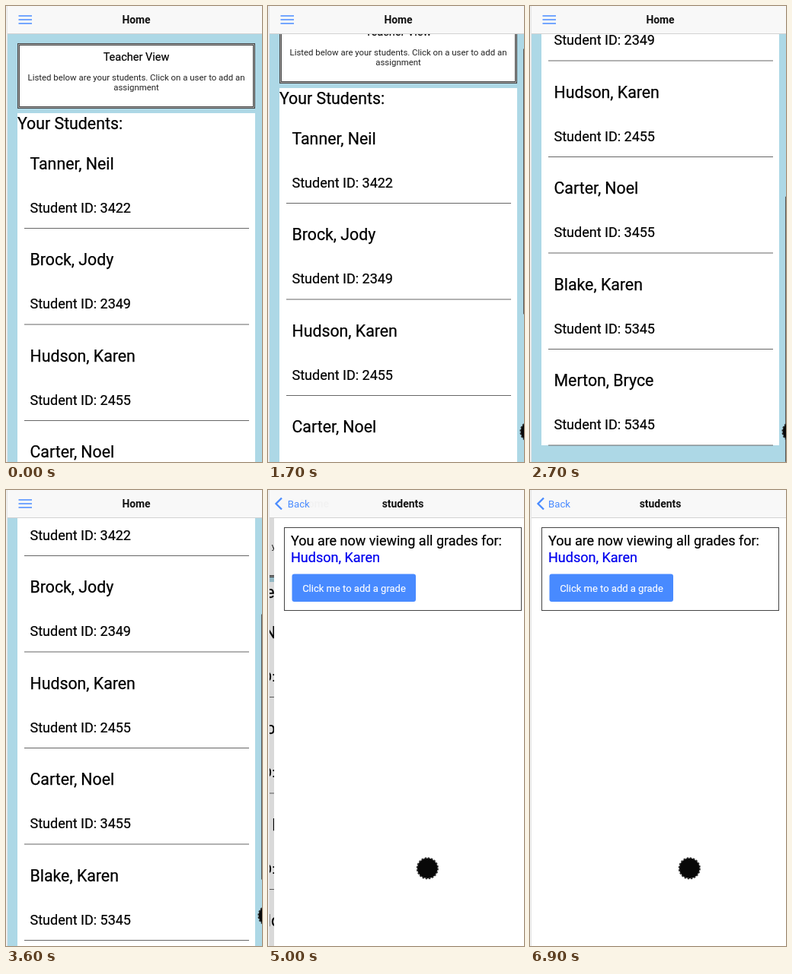
An HTML page for the animation above (7000 ms loop, 336 by 600 pixels).

```html
<!DOCTYPE html>
<html lang="en">
<head>
<meta charset="utf-8">
<title>Student list</title>
<style>
  html, body { margin: 0; width: 100%; height: 100%; overflow: hidden; background: #fff; }
  svg { display: block; width: 100vw; height: 100vh; font-family: Roboto, "Liberation Sans", sans-serif; }
  .h { font-size: 21.3px; stroke: #000; stroke-width: .25px; }
  .m { font-size: 18px; stroke: #000; stroke-width: .22px; }
  .s { font-size: 14.5px; stroke: #000; stroke-width: .2px; }
  .p { font-size: 11.4px; fill: #222; }
  .t { font-size: 13.9px; font-weight: 700; fill: #111; }
  .mid { text-anchor: middle; }
</style>
</head>
<body>
<svg viewBox="0 0 336 600" preserveAspectRatio="none">
  <defs>
    <clipPath id="view"><rect x="2" y="37" width="334" height="563"/></clipPath>
  </defs>
  <rect width="336" height="600" fill="#fff"/>

  <g clip-path="url(#view)">
    <g id="home">
      <rect x="2" y="36" width="338" height="564" fill="#add8e6"/>
      <g id="list">
        <rect x="15" y="49" width="312" height="86" fill="#444"/>
        <rect x="16" y="50" width="310" height="84" fill="#aaa"/>
        <rect x="17" y="51" width="308" height="82" fill="#444"/>
        <rect x="18" y="52" width="306" height="80" fill="#fff"/>
        <text class="s mid" x="171" y="71.5">Teacher View</text>
        <text class="p mid" x="171" y="97.5">Listed below are your students. Click on a user to add an</text>
        <text class="p mid" x="171" y="111">assignment</text>
        <rect x="15" y="141" width="312" height="784" fill="#fff"/>
        <text class="h" x="15" y="161.5">Your Students:</text>
      </g>
    </g>
    <rect id="shade" x="2" y="36" width="334" height="564" opacity="0"/>
    <rect id="bar" x="335" width="1" height="349" fill="#555" opacity="0"/>
    <g id="grades">
      <rect x="2" y="36" width="338" height="564" fill="#fff"/>
      <rect x="15.5" y="49.5" width="311" height="109" fill="#fff" stroke="#444"/>
      <text class="m" x="24" y="72.5">You are now viewing all grades for:</text>
      <text id="who" class="m" x="24" y="94.5" style="fill:#00e;stroke:#00e"></text>
      <rect x="25.5" y="110.5" width="162.5" height="36.5" rx="3" fill="#488aff"/>
      <text class="mid" x="107" y="133.5" font-size="13" fill="#fff" stroke="#fff" stroke-width=".15">Click me to add a grade</text>
    </g>
  </g>

  <rect x="2" width="334" height="36" fill="#f8f8f8"/>
  <rect x="2" y="36" width="334" height="1" fill="#d2d2d2"/>
  <g id="menu" stroke="#488aff" stroke-width="1.4">
    <path d="M16.5 13H34M16.5 18H34M16.5 23H34"/>
  </g>
  <text id="homeTitle" class="t mid" x="171" y="22.5">Home</text>
  <g id="back">
    <path d="M18 10.5L10.5 18L18 25.5" fill="none" stroke="#488aff" stroke-width="2.3"/>
    <text id="backText" x="24" y="22.6" font-size="13.2" fill="#488aff">Back</text>
  </g>
  <text id="gradesTitle" class="t mid" x="171" y="22.5">students</text>

  <rect width="2" height="600" fill="#f3f3f3"/>
  <rect x="1.4" width=".6" height="600" fill="#dcdcdc"/>
  <g id="dot">
    <circle r="13.3" fill="#080808"/>
    <circle r="13.6" fill="none" stroke="#2a2a2a" stroke-width="1.8" stroke-dasharray="2.6 1.67"/>
  </g>
</svg>
<script>
const LOOP = 7000, STEP = 100, WIDTH = 338;
const $ = id => document.getElementById(id);

const students = [
  ['Tanner, Neil', 3422], ['Brock, Jody', 2349], ['Hudson, Karen', 2455],
  ['Carter, Noel', 3455], ['Blake, Karen', 5345], ['Merton, Bryce', 5345]
];
$('list').insertAdjacentHTML('beforeend', students.map(([name, id], i) => {
  const y = i * 126.5;
  return `<text class="h" x="31.5" y="${214.5 + y}">${name}</text>
    <text class="m" x="31.5" y="${271.5 + y}">Student ID: ${id}</text>
    <rect x="24" y="${292 + y}" width="295" height="1" fill="#666"/>`;
}).join(''));
$('who').textContent = students[2][0];

// Tables of [time, value...]
const scrollKeys = [
  [1400, 0], [1500, 8], [1600, 22], [1700, 33], [1900, 33],
  [2000, 70], [2200, 195], [2300, 250], [2400, 295], [2500, 325], [2600, 341], [2700, 347], [2800, 347],
  [2900, 340], [3100, 318], [3200, 318],
  [3300, 306], [3400, 284], [3500, 250], [3600, 206], [3700, 140], [3800, 84], [3900, 42], [4000, 20]
];
const dotKeys = [
  [300, 362, 560], [800, 345, 560], [4000, 345, 560],
  [4100, 277.5, 566], [4200, 256, 566], [4300, 228, 526], [4400, 209.3, 497.8]
];
const barKeys = [[1400, 0], [1500, 1], [4100, 1], [4400, 0]];

function at(keys, t, col = 1) {
  const i = keys.findIndex(k => k[0] > t);
  if (i < 0) return keys[keys.length - 1][col];
  if (i === 0) return keys[0][col];
  const a = keys[i - 1], b = keys[i];
  return a[col] + (b[col] - a[col]) * (t - a[0]) / (b[0] - a[0]);
}

// cubic-bezier(.36, .66, .04, 1)
function ease(x) {
  if (x <= 0) return 0;
  if (x >= 1) return 1;
  const curve = (s, a, b) => 3 * (1 - s) ** 2 * s * a + 3 * (1 - s) * s * s * b + s ** 3;
  let lo = 0, hi = 1;
  for (let i = 0; i < 30; i++) {
    const s = (lo + hi) / 2;
    if (curve(s, .36, .04) < x) lo = s; else hi = s;
  }
  return curve(lo, .66, 1);
}

const move = (id, x, y = 0) => $(id).setAttribute('transform', `translate(${x} ${y})`);
const fade = (id, o) => $(id).setAttribute('opacity', o);

function draw(t) {
  const scroll = at(scrollKeys, t);
  const p = ease((t - 4560) / 645);
  const enter = WIDTH * (1 - p), leave = -WIDTH * .33 * p;

  move('list', 0, -Math.round(scroll));
  $('bar').setAttribute('y', 36 + scroll * .619);
  fade('bar', at(barKeys, t));

  move('home', leave);
  fade('shade', .15 * p);
  move('grades', enter);

  move('homeTitle', leave);
  fade('homeTitle', 1 - p);
  fade('menu', 1 - p);
  move('gradesTitle', enter);
  move('backText', 100 * (1 - p));
  fade('back', p);

  move('dot', at(dotKeys, t, 1), at(dotKeys, t, 2));
}

const start = performance.now();
function tick() {
  const t = (performance.now() - start) % LOOP;
  draw(Math.floor(t / STEP) * STEP);
  requestAnimationFrame(tick);
}
tick();
</script>
</body>
</html>
```
